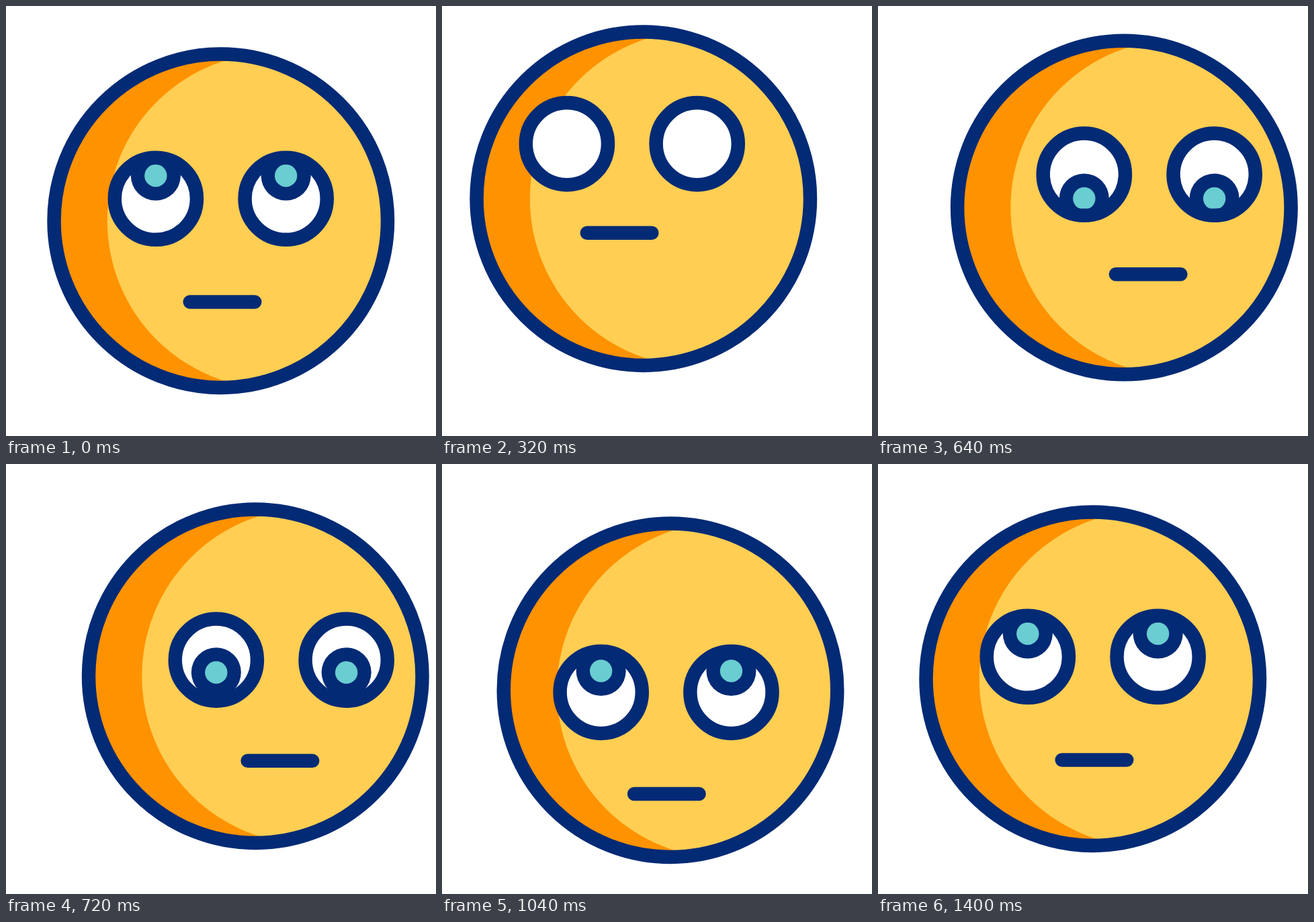
Recreate the animation shown at these times as an HTML page without scripts. Size 640 px wide and 640 px high, loop 2000 ms.

```html
<!DOCTYPE html>
<html lang="en">
<head>
<meta charset="utf-8">
<title>Eye roll</title>
<style>
  @property --t { syntax: "<number>"; inherits: true; initial-value: 0; }
  @keyframes clock { from { --t: 0; } to { --t: 2000; } }

  html, body { margin: 0; height: 100%; overflow: hidden; background: #fff; }

  /* --t is the loop time in ms, ticking 25 times a second */
  svg { display: block; width: 100%; height: 100%; animation: clock 2s steps(50) -1ms infinite; }

  .line { fill: none; stroke: #032a75; stroke-width: 20.5; stroke-linecap: round; }
  .navy { fill: #032a75; }
  .teal { fill: #69cdd1; }

  /* Each cosine is one eased leg of a move: its start time, then its length */
  .head {
    --x: 13.75 * cos(180deg * clamp(0, var(--t) / 220, 1))
       - 39.5 * cos(180deg * clamp(0, (var(--t) - 220) / 500, 1))
       + 25.75 * cos(180deg * pow(clamp(0, (var(--t) - 720) / 680, 1), .75));
    --y: 16.55 * cos(180deg * clamp(0, var(--t) / 320, 1))
       - 4.15 * cos(180deg * clamp(0, (var(--t) - 320) / 400, 1))
       - 25.15 * cos(180deg * clamp(0, (var(--t) - 560) / 360, 1))
       + 12.75 * cos(180deg * pow(clamp(0, (var(--t) - 920) / 480, 1), .67));
  }
  .eyes {
    --x: 13.25 * cos(180deg * clamp(0, var(--t) / 200, 1))
       - 32.5 * cos(180deg * clamp(0, (var(--t) - 200) / 480, 1))
       + 24 * cos(180deg * clamp(0, (var(--t) - 730) / 370, 1))
       - 4.75 * cos(180deg * clamp(0, (var(--t) - 1100) / 300, 1));
    --y: 30 * cos(180deg * pow(clamp(0, var(--t) / 430, 1), 1.15))
       - 48.5 * cos(180deg * clamp(0, (var(--t) - 420) / 470, 1))
       + 18.5 * cos(180deg * pow(clamp(0, (var(--t) - 1020) / 380, 1), .8));
  }
  .mouth {
    --x: 25.5 * cos(180deg * clamp(0, var(--t) / 200, 1))
       - 42.7 * cos(180deg * clamp(0, (var(--t) - 200) / 470, 1))
       + 22.7 * cos(180deg * clamp(0, (var(--t) - 740) / 360, 1))
       - 5.5 * cos(180deg * clamp(0, (var(--t) - 1100) / 300, 1));
    --y: 37 * cos(180deg * clamp(0, var(--t) / 380, 1))
       - 54.25 * cos(180deg * clamp(0, (var(--t) - 400) / 490, 1))
       + 17.25 * cos(180deg * pow(clamp(0, (var(--t) - 1020) / 380, 1), .8));
  }
  /* Pupils leave over the top, then come back from below */
  .pupil {
    --below: clamp(0, var(--t) - 330, 1);
    --x: 0;
    --y: -34.2
       - 30 * (1 - var(--below)) * (1 - cos(180deg * clamp(0, var(--t) / 320, 1)))
       + 108 * var(--below) * pow(clamp(0, (1080 - var(--t)) / 600, 2), 1.4);
  }
  .head, .eyes, .mouth, .pupil {
    transform: translate(calc(1px * (var(--x))), calc(1px * (var(--y))));
  }
</style>
</head>
<body>
<svg viewBox="0 0 640 640">
  <defs>
    <clipPath id="face"><circle r="244"/></clipPath>
    <clipPath id="white"><circle r="56"/></clipPath>
    <g id="eye">
      <circle r="60" fill="#fff"/>
      <g clip-path="url(#white)">
        <g class="pupil">
          <circle class="navy" r="37"/>
          <circle class="teal" r="16.7"/>
        </g>
      </g>
      <circle class="line" r="61.1"/>
    </g>
  </defs>
  <g transform="translate(319.75 319.75)">
    <g class="head">
      <circle r="246" fill="#ff9200"/>
      <g clip-path="url(#face)"><circle cx="81" r="250" fill="#ffce52"/></g>
      <circle class="line" r="248.25"/>
      <g class="eyes">
        <use href="#eye" x="-96.9" y="-33"/>
        <use href="#eye" x="96.9" y="-33"/>
      </g>
      <path class="line mouth" d="M-46 120.75H50.5"/>
    </g>
  </g>
</svg>
</body>
</html>
```
